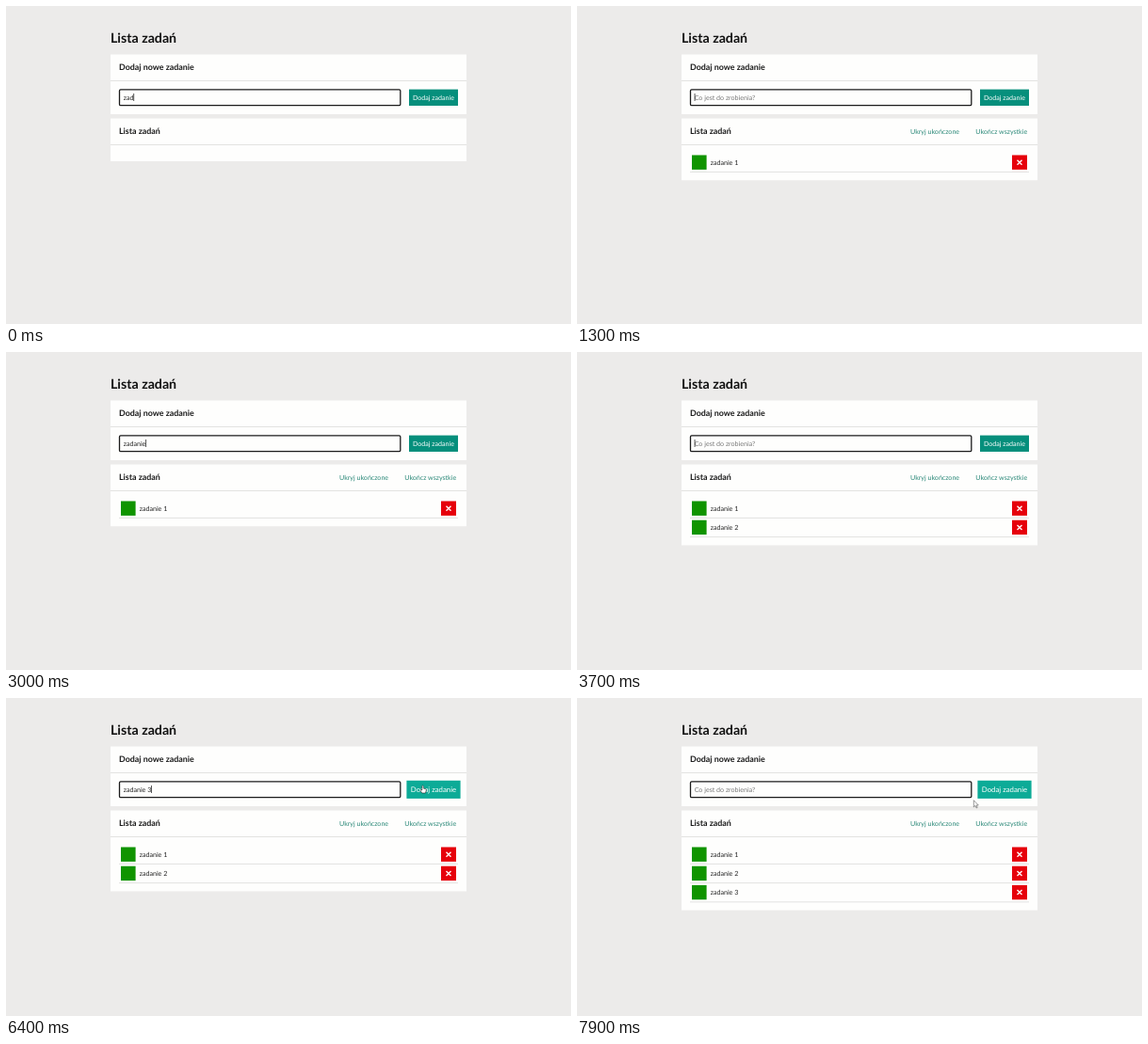
Animation of 600x338 px, one loop 8000 ms. Source, as an HTML page:

```html
<!DOCTYPE html>
<html lang="pl">
<head>
<meta charset="utf-8">
<title>Lista zadań</title>
<style>
  html, body { margin: 0; width: 100%; height: 100%; overflow: hidden; background: #ecebea; }
  svg { display: block; width: 100%; height: 100%; }
  text { font: 7.1px Lato, "Open Sans", sans-serif; fill: #222; white-space: pre; text-rendering: geometricPrecision; }
  .title { font-size: 14.2px; font-weight: 700; fill: #111; }
  .head { font-size: 8.9px; font-weight: 700; fill: #1a1a1a; }
  .link { fill: #2a8878; }
  .panel { fill: #fefefd; }
  .line { stroke: #dcdcdb; stroke-width: .8; }
</style>
</head>
<body>
<svg viewBox="0 0 600 338">
  <rect width="600" height="338" fill="#ecebea"/>
  <text class="title" x="111" y="38.6">Lista zadań</text>

  <rect class="panel" x="111" y="51.5" width="378" height="63.5"/>
  <path class="line" d="M111 79.5H489"/>
  <text class="head" x="120" y="67.7">Dodaj nowe zadanie</text>
  <rect id="field" x="120.5" y="88.8" width="298.3" height="16.9" fill="#fefefd"/>
  <text id="entry" x="124.7" y="99.5"></text>
  <rect id="caret" y="93" width=".7" height="8" fill="#111"/>

  <g id="button">
    <rect x="428" y="88.6" width="52" height="17.4"/>
    <text x="454" y="99.6" text-anchor="middle" style="fill:#fff">Dodaj zadanie</text>
  </g>
  <rect id="ring" x="425.1" y="87.3" width="57.8" height="19.7" rx="1.2" fill="none" stroke="#12302d" stroke-width="1.3"/>

  <rect id="list" class="panel" x="111" y="119.5" width="378"/>
  <path class="line" d="M111 147.5H489"/>
  <text class="head" x="120" y="135.7">Lista zadań</text>
  <g id="links">
    <text class="link" x="354" y="135.6">Ukryj ukończone</text>
    <text class="link" x="423.3" y="135.6">Ukończ wszystkie</text>
  </g>
  <g id="rows"></g>

  <path id="arrow" d="M0 0V7.2L1.7 5.7L2.8 8.2L3.9 7.7L2.8 5.3H5Z" fill="#fff" stroke="#555" stroke-width=".6"/>
  <path id="hand" d="M-.7 .6Q0 -.5 .7 .6V3L3.2 3.7Q4 4 3.7 5.2L3 8H-.8L-2.6 5Q-2.4 4 -.7 5Z" fill="#fff" stroke="#222" stroke-width=".6"/>
</svg>
<script>
const LOOP = 8000, PITCH = 20.2;
const HOVER = 6250, PRESS = 6700, LEAVE = 7840;
const added = [960, 3660, 7230];
// Moments at which each character of a task appears
const keys = [
  [-300, -200, -100, 100, 200, 300, 400, 500, 700],
  [1800, 1930, 2060, 2190, 2320, 2450, 2580, 3100, 3200],
  [4200, 4300, 4400, 4500, 4600, 4700, 4800, 4900, 5000]
];
const path = [[5850, 451, 150], [6300, 442.5, 93], [7550, 442.5, 93], [7880, 421.3, 108.7]];

const $ = id => document.getElementById(id);
const set = (el, attrs) => { for (const k in attrs) el.setAttribute(k, attrs[k]); };
const show = (el, on) => el.setAttribute("visibility", on ? "visible" : "hidden");
const clamp = v => Math.max(0, Math.min(1, v));
const ease = v => v * v * (3 - 2 * v);

$("rows").innerHTML = added.map((_, i) => `
  <g transform="translate(0 ${i * PITCH})">
    <rect x="122" y="158.5" width="15.6" height="15.4" fill="#109400"/>
    <text x="141.7" y="168.7">zadanie ${i + 1}</text>
    <rect x="462" y="158.5" width="16" height="15.4" fill="#e6000b"/>
    <path d="M467.5 163.7l5 5m0-5l-5 5" stroke="#fff" stroke-width="1.35"/>
    <path class="line" d="M120 176.4H480"/>
  </g>`).join("");
const rows = [...$("rows").children];

function pointer(t) {
  let i = 0;
  while (i < path.length - 2 && t > path[i + 1][0]) i++;
  const [a, ax, ay] = path[i], [b, bx, by] = path[i + 1];
  const p = ease(clamp((t - a) / (b - a)));
  return `translate(${ax + (bx - ax) * p} ${ay + (by - ay) * p})`;
}

function draw(t) {
  const count = added.filter(a => t >= a).length;
  const typed = (keys[count] || []).filter(k => t >= k);
  const value = `zadanie ${count + 1}`.slice(0, typed.length);
  const last = Math.max(typed.length ? typed.at(-1) : -Infinity, count ? added[count - 1] : 0);

  const entry = $("entry");
  entry.textContent = value || "Co jest do zrobienia?";
  entry.style.fill = value ? "#222" : "#777";

  const onButton = t >= PRESS && t < added[2];
  set($("field"), {
    stroke: onButton ? "#dcdcdb" : "#1b1b1b",
    "stroke-width": onButton ? .7 : 1.3,
    rx: onButton ? 0 : 1.3
  });
  set($("caret"), { x: 124.7 + (value ? entry.getComputedTextLength() : 0) });
  show($("caret"), !onButton && (t - last) % 1060 < 530);

  const h = ease(clamp((t - HOVER) / 150));
  const mix = (a, b) => Math.round(a + (b - a) * h);
  set($("button"), {
    transform: `translate(454 97.2) scale(${1 + .1 * h}) translate(-454 -97.2)`,
    fill: `rgb(${mix(6, 13)},${mix(143, 171)},${mix(124, 151)})`
  });
  show($("ring"), onButton);

  set($("list"), { height: 45.5 + count * PITCH });
  show($("links"), count > 0);
  rows.forEach((row, i) => show(row, i < count));

  const over = t >= HOVER && t < LEAVE;
  for (const id of ["arrow", "hand"]) set($(id), { transform: pointer(t) });
  show($("hand"), over);
  show($("arrow"), t >= path[0][0] && !over);
}

function tick() {
  draw(performance.now() % LOOP);
  requestAnimationFrame(tick);
}
tick();
</script>
</body>
</html>
```
